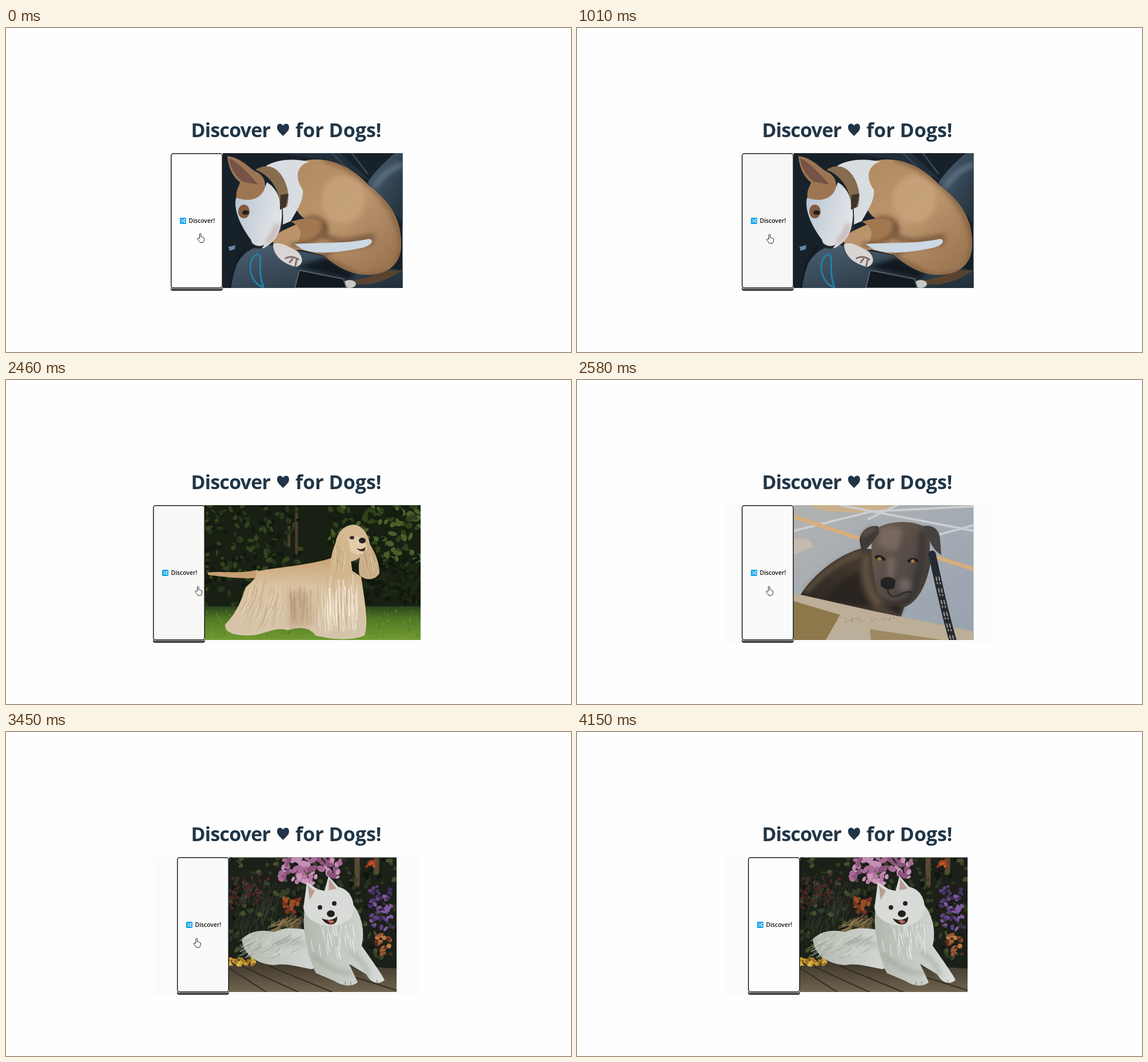
An HTML page that plays this animation: 988x567 px, repeating every 5.11 s.

```html
<!DOCTYPE html>
<html lang="en">
<head>
<meta charset="utf-8">
<title>Discover dogs</title>
<style>
html, body { margin: 0; width: 100%; height: 100%; overflow: hidden; background: #fefefe; }
svg { display: block; }
text { font-family: "Open Sans", "Noto Sans", sans-serif; }
.title { font-size: 34px; font-weight: 700; fill: #213547; }
.line { fill: none; stroke-linecap: round; }
.soft { filter: blur(4px); }
</style>
</head>
<body>
<svg id="stage" width="988" height="567" viewBox="0 0 988 567">
<defs>
  <linearGradient id="seat" x2="1" y2="1"><stop stop-color="#4c6072"/><stop offset="1" stop-color="#202d38"/></linearGradient>
  <linearGradient id="tan" x2="1" y2="1"><stop stop-color="#b0875f"/><stop offset=".5" stop-color="#bc966e"/><stop offset="1" stop-color="#936e4b"/></linearGradient>
  <linearGradient id="face" x2="1" y2=".4"><stop stop-color="#b4c3d0"/><stop offset="1" stop-color="#e2e4e7"/></linearGradient>
  <linearGradient id="lawn" x2="0" y2="1"><stop stop-color="#2b421c"/><stop offset=".35" stop-color="#4f7625"/><stop offset="1" stop-color="#719b31"/></linearGradient>
  <linearGradient id="coat" x2="0" y2="1"><stop stop-color="#c9a274"/><stop offset=".35" stop-color="#d9c2a0"/><stop offset="1" stop-color="#d5c5ab"/></linearGradient>
  <linearGradient id="road" x2="1" y2="1"><stop stop-color="#b2b2b1"/><stop offset=".5" stop-color="#a3abb3"/><stop offset="1" stop-color="#98a2ae"/></linearGradient>
  <linearGradient id="dark" x2="1" y2="0"><stop stop-color="#29241f"/><stop offset=".6" stop-color="#4b4035"/><stop offset="1" stop-color="#45403c"/></linearGradient>
  <linearGradient id="brow" x2="1" y2="1"><stop stop-color="#6c5d50"/><stop offset=".5" stop-color="#574d47"/><stop offset="1" stop-color="#403c3b"/></linearGradient>
  <linearGradient id="snow" x2="1" y2="0"><stop stop-color="#b3b8ad"/><stop offset="1" stop-color="#d9dddc"/></linearGradient>
  <linearGradient id="deck" x2="0" y2="1"><stop stop-color="#3c352b"/><stop offset="1" stop-color="#71644f"/></linearGradient>
  <clipPath id="torso"><path id="torso-shape" d="M508 236C555 220 598 238 631 272C668 302 693 330 691 383C689 416 665 433 628 432C598 430 575 415 554 397L515 388C490 391 466 382 465 370C475 354 506 347 524 335C500 320 490 282 508 236Z"/></clipPath>
  <clipPath id="skull"><path id="skull-shape" d="M517 265C536 246 586 243 610 258C621 277 618 306 610 329C604 360 593 386 571 393C550 397 530 388 526 371C517 340 512 297 517 265Z"/></clipPath>
</defs>

<rect width="988" height="567" fill="#fefefe"/>
<rect id="band" x="258" y="219" height="241" fill="#fbfbfb"/>
<text class="title" x="323.500" y="191" letter-spacing="-.8">Discover</text>
<path d="M484.500 189C479 183 474 180 474 174C474 166 482 166 484.500 171C487 166 495 166 495 174C495 180 490 183 484.500 189Z" fill="#213547"/>
<text class="title" x="506" y="191">for Dogs!</text>

<svg class="scene" x="379" y="219" width="314.500" height="236" viewBox="379 219 314.500 236">
  <path d="M379 219H694V455H379Z" fill="#17212a"/>
  <path d="M470 219L585 219L640 270L560 230Z" fill="#222f3a"/>
  <path d="M694 219V345C672 310 650 290 632 271C645 250 665 232 680 219Z" fill="url(#seat)"/>
  <path d="M690 240Q660 252 646 276" class="line soft" stroke="#71869a" stroke-width="9" opacity=".7"/>
  <path d="M570 219L612 260M605 219L632 255" class="line" stroke="#35434e" stroke-width="3"/>
  <path d="M392 455C394 410 425 372 470 382L694 425V455Z" fill="url(#seat)"/>
  <path d="M392 455C396 425 405 400 420 382" class="line" stroke="#111a22" stroke-width="3"/>
  <path d="M505 418L560 402L610 430L600 440Z" class="soft" fill="#111920"/>
  <path d="M389 383L401 380L400 387L391 390Z" fill="#6688a5"/>
  <path d="M694 424C665 442 635 455 603 446C610 438 632 440 660 425Z" fill="#59432f"/>
  <ellipse cx="601" cy="448" rx="11" ry="7" fill="#c9c8c4"/>
  <use href="#torso-shape" fill="url(#tan)"/>
  <g clip-path="url(#torso)">
    <g class="soft">
      <ellipse cx="590" cy="300" rx="38" ry="42" fill="#c8a47d" opacity=".8"/>
      <path d="M560 230C620 245 691 310 694 385L680 432L620 436L552 400" class="line" stroke="#7c5a3b" stroke-width="11" opacity=".75"/>
      <path d="M522 337C545 326 565 340 557 366L590 374L640 365" class="line" stroke="#69492f" stroke-width="9" opacity=".75"/>
    </g>
  </g>
  <path d="M455 241C476 229 503 228 530 234C505 242 506 265 519 283C521 304 506 322 498 338L484 344C487 300 475 270 455 241Z" fill="#d8dde2"/>
  <path d="M498 339C534 327 557 336 556 356C553 370 530 376 505 379C520 366 519 348 498 339Z" fill="#a27850"/>
  <path d="M500 379C537 383 562 363 555 344M556 397C580 379 610 383 640 375" class="line soft" stroke="#5b402b" stroke-width="5"/>
  <path d="M504 378C548 375 595 378 635 369C646 372 638 383 616 386C578 394 542 396 518 387Z" fill="#ccd8e3"/>
  <path d="M406 293C428 301 450 292 456 270C476 280 487 313 481 343C478 362 469 374 453 384C442 389 431 382 428 370C415 353 397 322 402 298Z" fill="url(#face)"/>
  <path d="M458 374Q471 360 474 346" class="line soft" stroke="#b79c98" stroke-width="9" opacity=".7"/>
  <path d="M387 224C411 227 424 244 436 251C450 257 454 267 453 279C446 301 423 305 403 297C401 283 409 275 409 270C396 260 389 244 387 224Z" fill="#9d7552"/>
  <path d="M390 228C405 234 424 254 441 274L414 269C399 257 392 243 390 228Z" fill="#755345"/>
  <path d="M436 248C450 239 466 240 477 252C491 267 498 293 491 313L479 318C481 290 467 260 436 248Z" fill="#866d50"/>
  <path d="M480 292L494 290L489 313L479 318Z" fill="#3d342b"/>
  <ellipse cx="416" cy="321" rx="10" ry="12" fill="#855b3f"/>
  <ellipse cx="419" cy="323" rx="6" ry="4" fill="#241e1c"/>
  <path d="M431 377Q442 385 452 379L447 386H436Z" fill="#28272a"/>
  <path d="M467 378C481 373 493 383 507 389C521 399 521 414 508 418C491 415 467 402 467 378Z" fill="#d9d5d5"/>
  <path d="M489 403Q500 397 511 405M496 410L501 404M506 416L508 406" class="line" stroke="#816a65" stroke-width="3"/>
  <path d="M447 453C421 440 423 401 439 396C451 396 438 422 450 453" class="line" stroke="#2580a6" stroke-width="3"/>
  <path d="M505 455L513 424L590 439L595 455Z" fill="#121a20" stroke="#56616a" stroke-width="2"/>
</svg>

<svg class="scene" x="347" y="219" width="378" height="236" viewBox="347 219 378 236">
  <path d="M347 219H725V455H347Z" fill="#172012"/>
  <path d="M508 225V303M495 245V290" class="line" stroke="#4c3d2a" stroke-width="5"/>
  <g id="hedge"></g>
  <path d="M347 396H725V455H347Z" fill="url(#lawn)"/>
  <g id="grass"></g>
  <path d="M353 337C375 334 410 340 440 332L445 346C412 349 378 344 353 341Z" fill="#c4a073"/>
  <path d="M437 335C470 328 535 324 570 311L621 344C626 380 635 424 627 447C606 457 567 454 541 447C532 433 513 431 493 438C470 430 448 448 426 447C400 448 379 441 384 427C404 407 413 382 419 363C432 351 440 346 437 335Z" fill="url(#coat)"/>
  <path d="M495 372C515 362 532 370 537 405V428C520 429 505 431 495 433Z" class="soft" fill="#b99b79" opacity=".6"/>
  <g id="fur"></g>
  <path d="M576 293C576 267 591 254 608 253C626 255 635 274 637 292C621 314 605 322 579 318Z" fill="#d4b992"/>
  <path d="M586 268C572 287 565 314 568 343C582 353 599 350 606 337C602 309 601 281 586 268Z" fill="#d1b68e"/>
  <path d="M628 277C638 287 653 313 653 338C646 351 628 352 618 341C614 318 622 294 628 277Z" fill="#ccb08a"/>
  <path d="M599 278C612 268 631 276 631 294C627 307 613 309 602 299Z" fill="#e1cdaa"/>
  <g id="ears"></g>
  <ellipse cx="605" cy="276" rx="4" ry="3" fill="#382b22"/>
  <ellipse cx="623" cy="281" rx="6" ry="5" fill="#25211e"/>
  <path d="M613 294Q621 299 629 292L627 299Q619 302 613 294Z" fill="#392c27"/>
</svg>

<svg class="scene" x="379" y="219" width="314.500" height="236" viewBox="379 219 314.500 236">
  <path d="M379 219H694V455H379Z" fill="url(#road)"/>
  <ellipse cx="480" cy="220" rx="69" ry="12" fill="#c9b08c"/>
  <path d="M379 264L515 230L694 221M460 219L694 264M635 270L694 254M560 219L510 243" class="line" stroke="#cbced0" stroke-width="4"/>
  <path d="M379 239L510 283M622 308L694 331" stroke="#d6ae7c" stroke-width="7"/>
  <path d="M379 278Q405 272 414 291L379 306Z" fill="#c2bbae"/>
  <path d="M389 379C406 350 446 310 496 295L621 300C617 340 604 386 572 398L565 419L521 409Z" fill="url(#dark)"/>
  <g class="soft">
    <path d="M402 369Q445 320 494 304" class="line" stroke="#75634d" stroke-width="9" opacity=".7"/>
    <path d="M430 386C447 365 465 345 495 335C491 360 505 385 518 400Z" fill="#29241f"/>
    <path d="M506 310Q499 355 526 390" class="line" stroke="#75634f" stroke-width="9" opacity=".7"/>
    <path d="M535 393L570 396L563 411Z" fill="#231f1c"/>
  </g>
  <use href="#skull-shape" fill="url(#brow)"/>
  <g clip-path="url(#skull)">
    <g class="soft">
      <path d="M530 262Q550 251 570 262L560 300Q540 300 527 287Z" fill="#83746a" opacity=".65"/>
      <path d="M604 270Q606 330 582 388" class="line" stroke="#302d2c" stroke-width="15" opacity=".6"/>
      <path d="M550 315L548 342" class="line" stroke="#7d7069" stroke-width="13" opacity=".7"/>
      <path d="M528 384Q548 400 578 388" class="line" stroke="#292625" stroke-width="7"/>
      <ellipse cx="574" cy="359" rx="12" ry="12" fill="#77716e" opacity=".7"/>
    </g>
  </g>
  <path d="M527 256C509 253 495 264 494 281L498 302C510 294 519 281 528 268Z" fill="#403936"/>
  <path d="M500 273Q508 260 521 261" class="line soft" stroke="#756659" stroke-width="5"/>
  <path d="M604 256C622 252 634 261 635 280L637 306C624 299 618 285 611 269Z" fill="#454140"/>
  <path d="M523 310Q529 306 537 314M580 317Q587 311 595 316" class="line" stroke="#211f1d" stroke-width="5"/>
  <circle cx="529" cy="313" r="3" fill="#a77942"/><circle cx="587" cy="317" r="3" fill="#a77942"/>
  <path d="M531 349Q544 340 557 350L555 364Q542 371 531 360Z" fill="#242323"/>
  <path d="M543 367Q546 382 561 378Q574 369 584 371" class="line" stroke="#302c2a" stroke-width="3"/>
  <path d="M379 373L521 405L694 440V455H379Z" fill="#bcae97"/>
  <path d="M379 387L460 411L435 455H379Z" fill="#8d784c"/>
  <path d="M437 455L466 426L512 436L514 455Z" fill="#b9af9a"/>
  <path d="M512 436L640 455H514Z" fill="#9d8963"/>
  <g id="grit"></g>
  <path d="M621 305C630 344 640 397 657 455" class="line" stroke="#252a32" stroke-width="13"/>
  <path d="M628 345C635 380 644 420 654 455M633 345C640 380 649 420 659 455" class="line" stroke="#a89f8d" stroke-width="2" stroke-dasharray="6 4 2 9" stroke-linecap="butt"/>
</svg>

<svg class="scene" x="390" y="219.500" width="293" height="235.500" viewBox="390 219.500 293 235.500">
  <path d="M390 219H683V455H390Z" fill="#1b2018"/>
  <path d="M614 219V270M648 219V250" stroke="#5b4934" stroke-width="9"/>
  <g id="leaves"></g>
  <g id="straw"></g>
  <g id="blooms"></g>
  <path d="M390 407L470 400L683 414V455H390Z" fill="url(#deck)"/>
  <path d="M390 413L455 455M415 411L511 455M461 410L570 455M590 423L683 452" class="line" stroke="#302b24" stroke-width="2"/>
  <g id="yellow"></g>
  <path d="M412 363C430 344 455 347 469 350C486 341 508 343 525 346L560 410L533 415C506 410 491 404 468 408C439 405 418 394 412 363Z" fill="url(#snow)"/>
  <path d="M523 308C550 303 586 299 607 302C620 318 629 346 622 374C638 397 656 422 662 434C651 444 637 438 630 424L600 406L615 438C604 448 585 443 575 436L542 422C529 397 515 338 523 308Z" fill="url(#snow)"/>
  <path d="M534 388Q570 423 604 422M604 386Q630 406 634 425M469 370Q502 359 522 373" class="line soft" stroke="#959d91" stroke-width="6" opacity=".65"/>
  <g id="fluff"></g>
  <path d="M521 301L526 263L545 275L557 278L564 252L581 271C604 276 613 301 605 322C591 339 573 343 549 336C529 330 517 315 521 301Z" fill="#d8dbd8"/>
  <path d="M528 269L540 278L531 294ZM565 257L578 274L564 277Z" fill="#b99b91"/>
  <circle cx="549" cy="307" r="4" fill="#24221f"/><circle cx="574" cy="300" r="4" fill="#24221f"/>
  <ellipse cx="568" cy="318" rx="7" ry="6" fill="#20201f"/>
  <path d="M552 326Q567 333 579 323Q580 336 568 337Q557 336 552 326Z" fill="#30211e"/>
  <path d="M562 330Q570 328 575 332L568 336Z" fill="#b96965"/>
  <path d="M593 437L594 442M603 437V442M648 434L649 439" class="line" stroke="#777a72"/>
</svg>

<g id="button">
  <rect y="440" width="91" height="20" rx="4" fill="#393b40"/>
  <rect y="440" width="91" height="16.500" rx="4" fill="#d8d8d8"/>
  <rect id="face-fill" x=".75" y="219.750" width="89.500" height="235" rx="4" stroke="#1a1a1a" stroke-width="1.500"/>
  <rect x="16" y="332" width="11" height="11" rx="1.500" fill="#16a3e8"/>
  <path d="M18 335.500H20L23 339.500H25M18 339.500H20L23 335.500H25M23.800 334L25.300 335.500L23.800 337M23.800 338L25.300 339.500L23.800 341" fill="none" stroke="#fff"/>
  <text x="31.500" y="341" font-size="10.400" font-weight="600" fill="#111">Discover!</text>
</g>
<path id="hand" d="M4.500 9V2Q4.500.5 5.700.5T7 2V6.500Q8.800 5.700 9.300 7.200Q11 6.700 11.300 8.200Q12.800 8 12.800 9.500V12Q12.300 14.500 10.500 16.500H5.500Q4 13.500.800 10.500Q.700 8.500 2.500 8.700Z" fill="#fff" stroke="#222"/>
<path id="arrow" d="M.5.5V16L4 12.500L6.500 18L9 17L6.500 11.500H11.500Z" fill="#fff" stroke="#222"/>
</svg>

<script>
const $ = id => document.getElementById(id);
let seed = 7;
const rnd = () => (seed = seed * 16807 % 2147483647) / 2147483647;
const add = (id, tag, attrs) => {
  const el = document.createElementNS("http://www.w3.org/2000/svg", tag);
  for (const k in attrs) el.setAttribute(k, attrs[k]);
  $(id).append(el);
};

// Random leaves or petals inside a box
function specks(id, n, [x, y, w, h], colors, r) {
  for (let i = 0; i < n; i++) {
    const cx = x + rnd() * w, cy = y + rnd() * h;
    add(id, "ellipse", {
      cx, cy, rx: r * (.6 + rnd() * .8), ry: r * (.4 + rnd() * .5),
      fill: colors[i % colors.length], transform: `rotate(${rnd() * 180} ${cx} ${cy})`
    });
  }
}

// Random hairs or blades inside a box
function strands(id, n, [x, y, w, h], len, lean, colors, width = 1) {
  for (let i = 0; i < n; i++) {
    const px = x + rnd() * w, py = y + rnd() * h, dx = lean * (.4 + rnd());
    add(id, "path", {
      d: `M${px} ${py}q${dx * .1} ${len * .5} ${dx} ${len}`, fill: "none",
      stroke: colors[i % colors.length], "stroke-width": width, opacity: .65
    });
  }
}

specks("hedge", 230, [347, 219, 170, 175], ["#26341b", "#35431f", "#101810"], 5);
specks("hedge", 170, [565, 219, 160, 110], ["#30421b", "#49602a", "#141d0d"], 6);
specks("hedge", 90, [625, 315, 100, 75], ["#1d2814", "#10180d"], 6);
strands("grass", 220, [347, 405, 378, 48], -5, 2, ["#86a63d", "#3f651f", "#6d942f"]);
strands("fur", 55, [425, 349, 60, 50], 40, -16, ["#e9dcc5", "#baa17d"]);
strands("fur", 70, [543, 337, 72, 60], 47, 2, ["#f3ead9", "#c3aa88", "#fff8eb"], 1.5);
strands("fur", 30, [494, 358, 42, 35], 38, 0, ["#dbc8ab", "#a98c68"]);
strands("ears", 18, [576, 285, 20, 28], 30, -3, ["#e3d0b1", "#b39770"]);
strands("ears", 18, [624, 292, 16, 24], 28, 6, ["#e3d0b1", "#a98c67"]);
specks("grit", 60, [460, 416, 100, 7], ["#c6b89e", "#887657"], 1);
specks("leaves", 240, [390, 219, 293, 175], ["#343f26", "#10150f", "#2a351f", "#46502f"], 5);
strands("leaves", 90, [390, 285, 85, 85], -30, 9, ["#46513a", "#2c3a29"]);
specks("leaves", 75, [390, 248, 74, 60], ["#522327", "#3b2320", "#49302a"], 3);
strands("straw", 45, [475, 319, 45, 25], 13, -20, ["#a78c5c", "#786044"], 1.5);
specks("blooms", 65, [479, 221, 106, 38], ["#a96a96", "#c590b6", "#8c527c"], 6);
specks("blooms", 18, [502, 252, 40, 16], ["#b77aa2", "#cc98ba"], 6);
specks("blooms", 55, [637, 270, 40, 75], ["#60417e", "#815aa0", "#453060"], 4);
specks("blooms", 15, [485, 290, 28, 25], ["#9d4b24", "#7d3021"], 5);
specks("blooms", 12, [631, 226, 14, 9], ["#cb552c", "#a63c23"], 4);
specks("blooms", 22, [645, 355, 28, 35], ["#9d5435", "#bc7841", "#57301f"], 5);
specks("yellow", 28, [391, 396, 45, 12], ["#c69c2d", "#a87527", "#d5b748"], 4);
strands("fluff", 65, [420, 352, 100, 36], 9, -14, ["#d2d5cc", "#9ea498"], 1.5);
strands("fluff", 70, [532, 331, 76, 45], 22, 4, ["#eceeed", "#b9bfb8"], 1.5);

const LOOP = 5110;
const buttonX = [288, 257, 288, 299];
// time, scene, button colour, band width, pointer, x, y
const steps = [
  [0, 0, "#fefefe", 0, "hand", 334, 359],
  [150, 0, "#f7f7f7", 0, "hand", 332, 360.5],
  [1010, 0, "#f7f7f7", 0, "hand", 331, 360.5],
  [1260, 1, "#f8f8f6", 0, "hand", 331, 360.5],
  [2460, 1, "#f8f8f6", 0, "hand", 330, 360.5],
  [2580, 2, "#fafafa", 466, "hand", 330, 360.5],
  [2870, 2, "#fafafa", 466, "hand", 329, 360.5],
  [3020, 2, "#fafafa", 466, "hand", 327.5, 360.5],
  [3450, 3, "#fafafa", 466, "hand", 327.5, 360.5],
  [3760, 3, "#fafafa", 466, "arrow", 640, 470],
  [3880, 3, "#fafafa", 466, "arrow", 962, 552],
  [4030, 3, "#fefefe", 42, "arrow", 972, 560],
  [4150, 3, "#fefefe", 42, "", 0, 0]
];
const scenes = document.querySelectorAll(".scene");
let shown;

function frame() {
  const t = performance.now() % LOOP;
  const step = steps.findLast(s => s[0] <= t);
  if (step !== shown) {
    shown = step;
    const [, scene, fill, band, pointer, x, y] = step;
    scenes.forEach((el, i) => el.style.display = i === scene ? "" : "none");
    $("button").setAttribute("transform", `translate(${buttonX[scene]} 0)`);
    $("face-fill").setAttribute("fill", fill);
    $("band").setAttribute("width", band);
    for (const id of ["hand", "arrow"]) {
      $(id).style.display = id === pointer ? "" : "none";
      $(id).setAttribute("transform", `translate(${x} ${y})`);
    }
  }
  requestAnimationFrame(frame);
}
frame();
</script>
</body>
</html>
```
